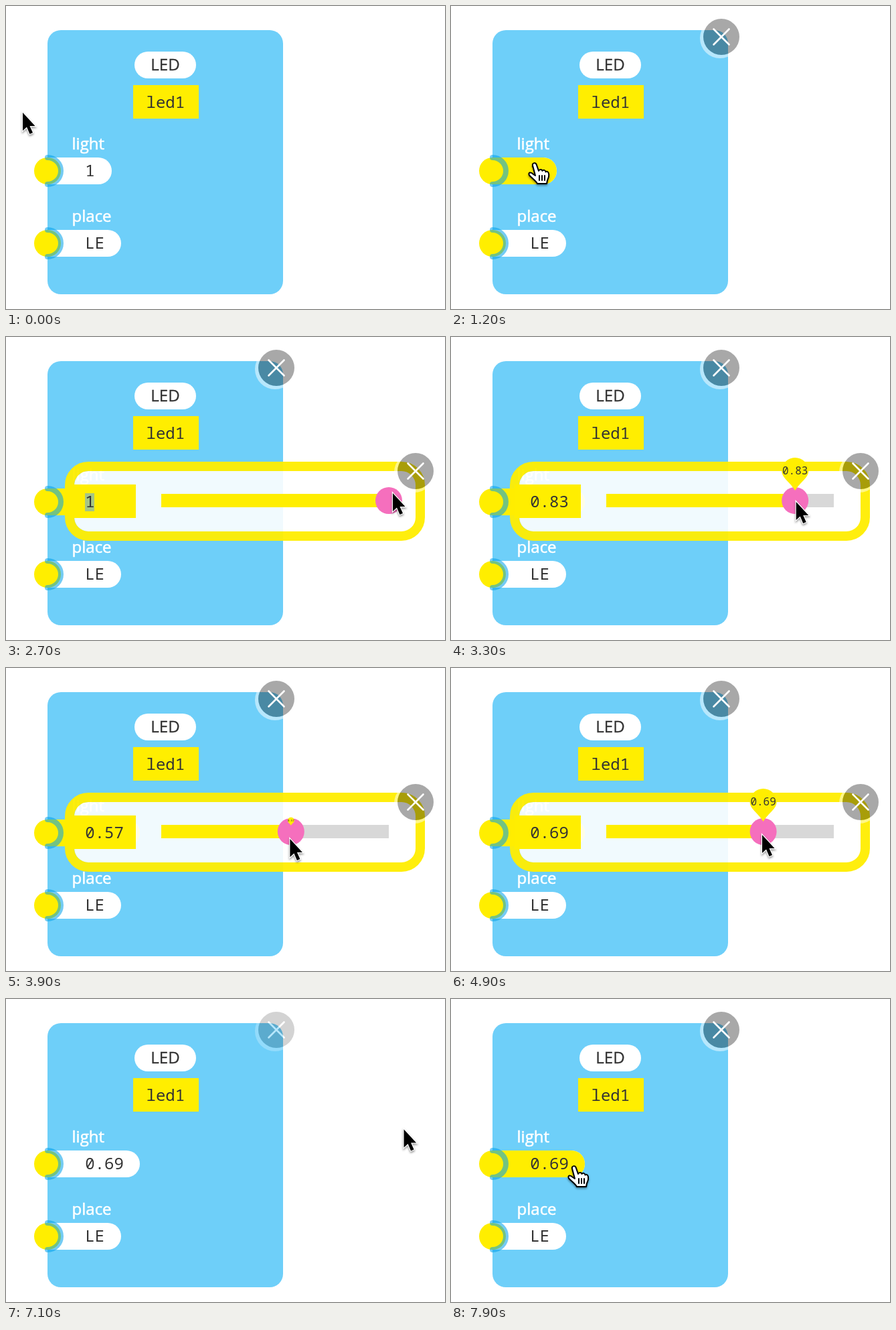
An HTML page that plays this animation: 656 by 452 pixels, repeating every 8000 ms.

```html
<!DOCTYPE html>
<html lang="en">
<head>
<meta charset="utf-8">
<title>LED block with slider</title>
<style>
  html, body { margin: 0; width: 100%; height: 100%; overflow: hidden; background: #fff; }
  svg { display: block; }
  text { font: 24px "Noto Sans Mono", monospace; fill: #333; }
  .sans { font-family: "Open Sans", sans-serif; stroke: #333; stroke-width: .3px; }
  .label { fill: #fff; stroke: #fff; stroke-width: .6px; }
  .yellow { fill: #ffee00; }
  .pink { fill: #f56fbd; }
  .ring { fill: none; stroke: rgba(0, 160, 235, .55); stroke-width: 8; stroke-linecap: round; }
  .cross { stroke: #fff; stroke-width: 2.6; stroke-linecap: round; }
  #cursor { filter: drop-shadow(0 2px 1.5px rgba(0, 0, 0, .4)); }
</style>
</head>
<body>
<svg width="656" height="452" viewBox="0 0 656 452">
  <defs>
    <g id="socket">
      <circle class="yellow" r="20"/>
      <path class="ring" d="M0-20A20 20 0 0 1 0 20"/>
    </g>
    <path id="halo" fill="#fff" fill-opacity=".5" fill-rule="evenodd"
      d="M-32 2a30 30 0 1 1 60 0a30 30 0 1 1-60 0zM-27 0a27 27 0 1 1 54 0a27 27 0 1 1-54 0z"/>
    <path id="cross" class="cross" d="M-11.5-11.5L11.5 11.5M11.5-11.5L-11.5 11.5"/>
  </defs>

  <rect x="62" y="36" width="352" height="394" rx="20" fill="#6ecff9"/>
  <rect x="192" y="68" width="92" height="40" rx="20" fill="#fff"/>
  <text class="sans" x="238" y="96" text-anchor="middle">LED</text>
  <rect class="yellow" x="190" y="118" width="98" height="50"/>
  <text x="209.5" y="152">led1</text>

  <text class="sans label" x="98.5" y="214">light</text>
  <path id="pill" fill="#fff"/>
  <path id="pillHover" class="yellow"/>
  <text id="pillText" x="118.3" y="254"></text>
  <use href="#socket" x="62" y="246"/>

  <text class="sans label" x="98.5" y="322">place</text>
  <path d="M62 334h90a20 20 0 0 1 0 40h-90z" fill="#fff"/>
  <text x="118.3" y="362">LE</text>
  <use href="#socket" x="62" y="354"/>

  <g id="cardClose" transform="translate(404 46)">
    <use href="#halo"/>
    <circle r="27" fill-opacity=".34"/>
    <use href="#cross"/>
  </g>

  <g id="popup">
    <rect x="102" y="200" width="510" height="90" rx="21" fill="#fff" fill-opacity=".9"/>
    <rect x="95" y="193" width="524" height="104" rx="28" fill="none"
      stroke="#ffee00" stroke-opacity=".95" stroke-width="14"/>
    <rect class="yellow" x="95" y="220" width="99" height="50"/>
    <rect id="selection" x="118" y="233" width="14" height="27" fill="#a5c586"/>
    <text id="inputText" x="118.3" y="254"></text>
    <rect x="232" y="234" width="340" height="20" fill="#d8d8d8"/>
    <rect id="filled" class="yellow" x="232" y="234" height="20"/>
    <circle id="knob" class="pink" cy="244" r="20"/>
    <g id="tip">
      <path class="yellow" d="M-20-29a20 20 0 1 1 40 0c0 10-12 16-20 29c-8-13-20-19-20-29z"/>
      <text id="tipText" y="-24" text-anchor="middle" style="font-size:16px"></text>
    </g>
    <g transform="translate(612 200)">
      <use href="#halo"/>
      <circle id="grey" r="27" fill-opacity=".34"/>
      <circle id="hot" r="27" fill="#ec0082" fill-opacity=".56"/>
      <use href="#cross"/>
    </g>
  </g>

  <g id="cursor">
    <path id="arrow" stroke="#fff" stroke-width="2.4" paint-order="stroke"
      d="M0 0V27L6 21.5L10.5 32L15 30L10.5 20H18.5Z"/>
    <g id="hand" stroke="#000" stroke-width="2" stroke-linejoin="round" stroke-linecap="round">
      <path fill="#fff" d="M-3 3C-4-1 1-2 2.5 1L6 11C7 8 11 8.5 11.5 11C13 9 16 9.5 16.5 12.5
        C18 11 20.5 12 21 15C22 20 20 22 19 25L18 30H4C2 26-4 22-8 17.5C-10 13-6 12-2 16L1 18Z"/>
      <path d="M7 18V25M11 18V25M15 18V25"/>
    </g>
  </g>
</svg>
<script>
const LOOP = 8000, STEP = 100;
const $ = id => document.getElementById(id);
const set = (id, attrs) => {
  for (const name in attrs) $(id).setAttribute(name, attrs[name]);
};
const clamp = (v, lo = 0, hi = 1) => Math.min(hi, Math.max(lo, v));
const ramp = (t, from, to) => clamp((t - from) / (to - from));

// Pointer stops: time, x, y
const stops = [
  [700, 25, 159], [1200, 125, 235], [2000, 125, 235], [2700, 578, 233],
  [3000, 575, 240], [3700, 424.4, 255], [4300, 424.4, 255], [4600, 465, 249],
  [4900, 465, 249], [5600, 610, 190], [5800, 613, 192], [7000, 613, 192],
  [7800, 184, 250]
];

function pointer(t) {
  const i = stops.findIndex(s => s[0] > t);
  if (i === 0) return stops[0].slice(1);
  if (i < 0) return stops[stops.length - 1].slice(1);
  const [t0, x0, y0] = stops[i - 1], [t1, x1, y1] = stops[i];
  const p = ramp(t, t0, t1), k = p * p * (3 - 2 * p);
  return [x0 + (x1 - x0) * k, y0 + (y1 - y0) * k];
}

function draw(t) {
  const [x, y] = pointer(t);

  // The slider follows the pointer only while dragging
  const dragX = pointer(clamp(t, 3000, 4900))[0];
  const value = Math.round(clamp((dragX - 232) / 340) * 100) / 100;
  const label = String(value), knobX = 232 + 340 * value;
  for (const id of ["pillText", "inputText", "tipText"]) $(id).textContent = label;
  set("filled", { width: 340 * value });
  set("knob", { cx: knobX });

  const size = ramp(t, 3000, 3200) - ramp(t, 3800, 3933) + ramp(t, 4300, 4500) - ramp(t, 4900, 5100);
  set("tip", { transform: `translate(${knobX} ${237 - 8 * size}) scale(${size})` });

  const pill = `M62 226h${62 + 14 * label.length}a20 20 0 0 1 0 40H62z`;
  const closing = ramp(t, 6100, 6300);
  set("pill", { d: pill });
  set("pillHover", { d: pill, opacity: ramp(t, 1000, 1200) - closing + ramp(t, 7600, 7800) });
  set("cardClose", { opacity: ramp(t, 800, 1200) - ramp(t, 7000, 7200) + ramp(t, 7400, 7700) });
  set("popup", { opacity: ramp(t, 1500, 1900) - closing });
  set("selection", { opacity: t < 3000 ? 1 : 0 });

  const hot = ramp(t, 5500, 5800);
  set("hot", { opacity: hot });
  set("grey", { opacity: 1 - hot });

  const pointing = (t >= 1100 && t <= 2000) || (t >= 5700 && t <= 7000) || t >= 7700;
  set("cursor", { transform: `translate(${x} ${y})` });
  set("hand", { opacity: pointing ? 1 : 0 });
  set("arrow", { opacity: pointing ? 0 : 1 });
}

const start = performance.now();
function tick() {
  const t = (performance.now() - start) % LOOP;
  draw(Math.floor(t / STEP) * STEP);
  requestAnimationFrame(tick);
}
tick();
</script>
</body>
</html>
```
